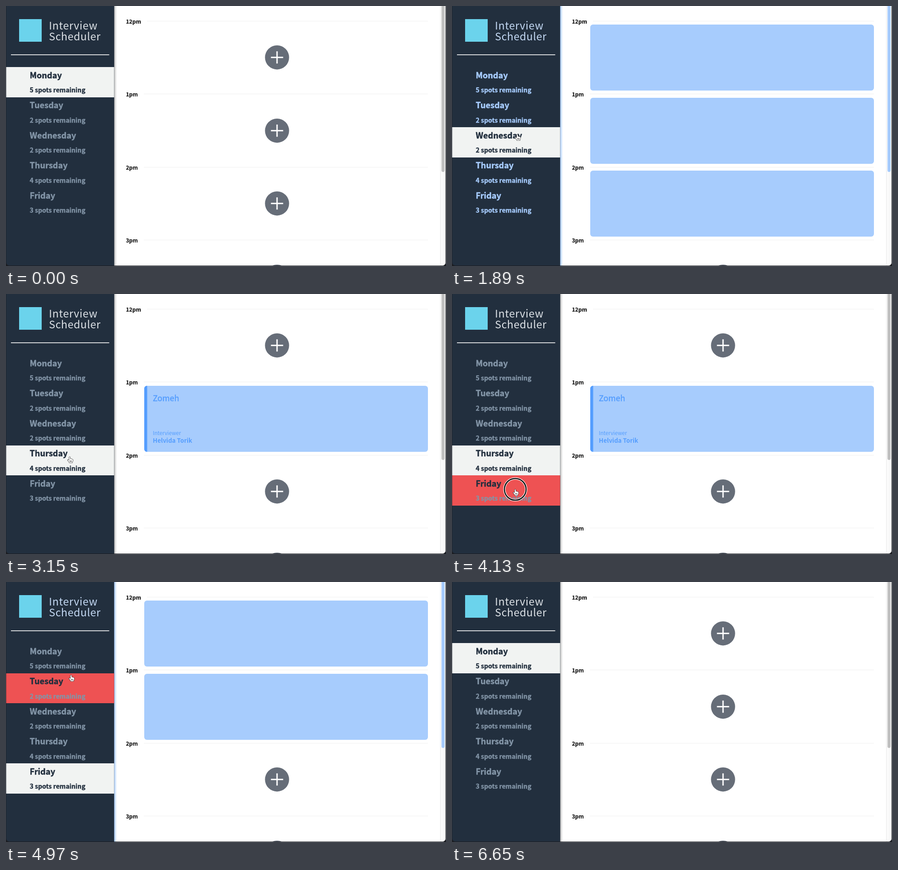
Write an HTML page with a canvas that moves like this. It is 974 px wide and 575 px high and loops after 7.07 s.

```html
<!DOCTYPE html>
<html lang="en">
<head>
<meta charset="utf-8">
<title>Weekly schedule</title>
<style>
  html, body { margin: 0; width: 100%; height: 100%; overflow: hidden; background: #111; }
  canvas { display: block; width: 974px; height: 575px; }
</style>
</head>
<body>
<canvas id="stage" width="974" height="575"></canvas>
<script>
const ctx = document.getElementById('stage').getContext('2d');
const LOOP = 7070, STEP = 70;
const FONT = '"Noto Sans CJK JP", "Noto Sans CJK SC", "Open Sans", sans-serif';
const NAVY = '#222f3e', GREY = '#8395a7', PALE = '#f1f3f2', RED = '#ee5253';
const SKY = '#a7ccfd', BLUE = '#549dfe', SLATE = '#666d78';
const SIDE = 239.4, ROW_TOP = 135.5, ROW_H = 66.5, SLOT_TOP = 33, SLOT_H = 161.6;

const days = [
  { name: 'Monday', spots: 5, cards: [] },
  { name: 'Tuesday', spots: 2, cards: [] },
  { name: 'Wednesday', spots: 2, cards: [0, 1, 2] },
  { name: 'Thursday', spots: 4, cards: [1], student: 'Zomeh', interviewer: 'Helvida Torik' },
  { name: 'Friday', spots: 3, cards: [0, 1] }
];

// Start time and index of each selected day
const selections = [[0, 0], [1890, 2], [2590, 3], [4200, 4], [6020, 0]];
const clicks = [[1680, 1890], [2450, 2590], [4060, 4200], [5810, 6020]];

// Pointer hotspot: time, x, y
const path = [
  [70, 622, 574], [980, 150, 228], [1120, 150, 228], [1330, 144.5, 261.5],
  [1750, 144.5, 284], [2100, 144.5, 284], [2520, 142, 352], [2730, 142, 352],
  [3150, 141, 360], [3500, 141, 366], [3990, 140, 432], [4410, 140, 432],
  [4970, 144, 206], [5460, 146, 172], [6230, 146, 172], [6650, 622, 578]
];

function pointerAt(time) {
  if (time < path[0][0] || time >= path[path.length - 1][0]) return null;
  const i = path.findIndex(p => p[0] > time);
  const [t0, x0, y0] = path[i - 1], [t1, x1, y1] = path[i];
  const k = (time - t0) / (t1 - t0), e = k * k * (3 - 2 * k);
  return { x: x0 + (x1 - x0) * e, y: y0 + (y1 - y0) * e };
}

// heft is the width of an outline that thickens the letters
function text(str, x, y, size, weight, color, { spacing = 0, heft = 0 } = {}) {
  ctx.font = `${weight} ${size}px ${FONT}`;
  ctx.letterSpacing = spacing + 'px';
  ctx.fillStyle = ctx.strokeStyle = color;
  ctx.fillText(str, x, y);
  if (heft) {
    ctx.lineWidth = heft;
    ctx.lineJoin = 'round';
    ctx.strokeText(str, x, y);
  }
}

function rect(x, y, w, h, color) {
  ctx.fillStyle = color;
  ctx.fillRect(x, y, w, h);
}

function rounded(x, y, w, h, r) {
  ctx.beginPath();
  ctx.roundRect(x, y, w, h, r);
}

function disc(x, y, r, color) {
  ctx.fillStyle = color;
  ctx.beginPath();
  ctx.arc(x, y, r, 0, Math.PI * 2);
  ctx.fill();
}

function addButton(y) {
  disc(600, y, 26.7, SLATE);
  rect(586.5, y - 1.5, 27, 3, '#fff');
  rect(598.5, y - 13.5, 3, 27, '#fff');
}

function card(y, day) {
  ctx.save();
  rounded(306, y, 628, 146, 6);
  ctx.clip();
  rect(306, y, 628, 146, SKY);
  if (day.student) {
    rect(306, y, 6.5, 146, BLUE);
    text(day.student, 325, y + 34, 17.8, 400, BLUE, { heft: 0.5 });
    text('Interviewer', 325, y + 109, 11.7, 400, BLUE);
    text(day.interviewer, 325, y + 126, 13.4, 600, BLUE);
  }
  ctx.restore();
}

function drawSchedule(day) {
  rect(SIDE, 0, 974 - SIDE, 575, '#fff');
  ['12pm', '1pm', '2pm', '3pm'].forEach((label, i) => {
    const y = Math.round(SLOT_TOP + i * SLOT_H - 0.4);
    text(label, 265.5, y + 5.5, 12, 700, '#111', { heft: 0.2 });
    const left = i ? 305 : 312;
    rect(left, y, 934 - left, 1, '#f0f0f0');
    if (day.cards.includes(i)) card(Math.round(41 + i * SLOT_H), day);
    else addButton(113.7 + Math.round(i * SLOT_H));
  });
}

function drawScrollbar(blue) {
  rect(961, 0, 13, 575, '#fafafa');
  rect(961, 0, 1, 575, '#e8e8e8');
  ctx.fillStyle = blue ? SKY : '#c1c1c1';
  rounded(964, -4, 7, 371, 3.5);
  ctx.fill();
}

function drawSidebar(selected, hover, hoverSpots, blue) {
  const shade = ctx.createLinearGradient(SIDE, 0, SIDE + 6, 0);
  shade.addColorStop(0, blue ? SKY : 'rgba(0,0,0,.25)');
  shade.addColorStop(1, blue ? 'rgba(167,204,253,0)' : 'rgba(0,0,0,0)');
  rect(SIDE, 0, 6, 575, shade);
  rect(0, 0, SIDE, 575, NAVY);

  rect(29, 29, 50, 50, '#6bd3ec');
  const titleColor = blue ? '#c3d8f3' : '#dce1e6';
  text('Interview', 95, 51.5, 23.3, 300, titleColor, { spacing: 0.6 });
  text('Scheduler', 95, 75.5, 23.3, 300, titleColor, { spacing: 0.5 });
  rect(11, 107, 217.5, 1.6, '#fff');

  const idle = selected === 2 && hover !== 3 ? SKY : GREY;
  const rowEdge = i => Math.floor(ROW_TOP + i * ROW_H);
  days.forEach((day, i) => {
    const y = ROW_TOP + i * ROW_H, active = i === selected, hot = i === hover;
    if (active || hot) {
      rect(0, rowEdge(i), SIDE, rowEdge(i + 1) - rowEdge(i), active ? PALE : RED);
    }
    const color = lit => active || lit ? NAVY : idle;
    text(day.name, 52.5, y + 24.3, 18.1, 700, color(hot && !hoverSpots), { heft: 0.5 });
    text(`${day.spots} spots remaining`, 52.5, y + 55.5, 14.1, 700,
      color(hot && hoverSpots), { heft: 0.35 });
  });
}

const hand = new Path2D('M-1.2 1Q0-.8 1.2 1V4.6Q2.5 3.8 3.3 5Q4.6 4.3 5.3 5.6' +
  'Q7 5.2 7 7V9Q6.6 11 5.6 12V13.5H-.6Q-1.2 11.6-3 9.6L-4.6 7.6Q-4.6 6-3 6.6L-1.2 8Z');
const arrow = new Path2D('M0 0V13L3 10.2L5 14.8L7 14L5 9.4H9Z');

function drawPointer(p, overRow, clicking) {
  if (clicking) {
    ctx.beginPath();
    ctx.arc(p.x, p.y, 24, 0, Math.PI * 2);
    ctx.strokeStyle = '#fff';
    ctx.lineWidth = 5;
    ctx.stroke();
    ctx.strokeStyle = '#111';
    ctx.lineWidth = 2.6;
    ctx.stroke();
  }
  ctx.save();
  ctx.translate(p.x, p.y);
  ctx.lineJoin = 'round';
  ctx.lineWidth = overRow ? 1.2 : 1.6;
  ctx.fillStyle = overRow ? '#fff' : '#111';
  ctx.strokeStyle = overRow ? '#111' : '#fff';
  const shape = overRow ? hand : arrow;
  ctx.stroke(shape);
  ctx.fill(shape);
  if (overRow) {
    ctx.lineWidth = 0.8;
    ctx.beginPath();
    for (const x of [0.4, 2.2, 4]) {
      ctx.moveTo(x, 8.4);
      ctx.lineTo(x, 11.4);
    }
    ctx.stroke();
  }
  ctx.restore();
}

function draw(time) {
  const selected = selections.filter(s => s[0] <= time).pop()[1];
  const blue = days[selected].cards.length > 1;
  const p = pointerAt(time);
  const offset = p && p.x < SIDE ? (p.y - ROW_TOP) / ROW_H : -1;
  const hover = offset >= 0 && offset < days.length ? Math.floor(offset) : -1;

  rect(0, 0, 974, 575, '#1b1d22');
  ctx.save();
  rounded(0.5, -10, 972.5, 584, 7);
  ctx.clip();
  drawSchedule(days[selected]);
  drawScrollbar(blue);
  drawSidebar(selected, hover, offset % 1 >= 0.5, blue);
  if (p) drawPointer(p, hover >= 0, clicks.some(([a, b]) => time >= a && time < b));
  ctx.restore();
}

function tick() {
  draw(Math.floor(performance.now() % LOOP / STEP) * STEP);
  requestAnimationFrame(tick);
}
tick();
</script>
</body>
</html>
```
